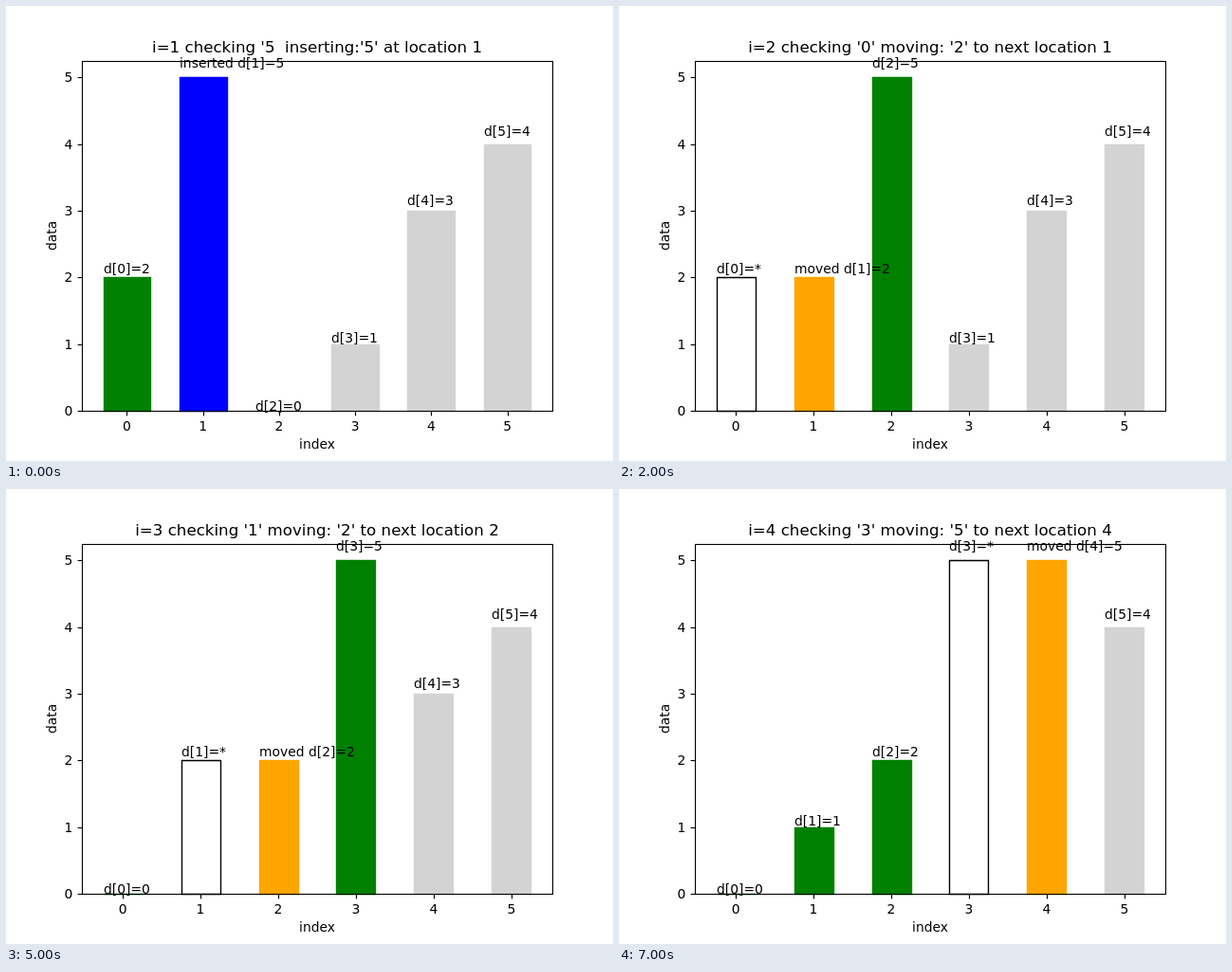
Recreate the animation shown at these times as an HTML page with a canvas. Size 640 by 480 pixels, loop 8 s.

```html
<!DOCTYPE html>
<html lang="en">
<head>
<meta charset="utf-8">
<title>Insertion sort</title>
<style>
html, body { margin: 0; width: 100%; height: 100%; overflow: hidden; background: #fff; }
canvas { display: block; }
</style>
</head>
<body>
<canvas id="chart" width="640" height="480"></canvas>
<script>
const ctx = document.getElementById('chart').getContext('2d');
const LEFT = 80, RIGHT = 576, TOP = 57.6, BOTTOM = 427.2;
const UNIT = (BOTTOM - TOP) / 5.25;
const STEP_MS = 1000, STEP_COUNT = 8;

const snap = v => Math.floor(v + 0.5) + 0.5;
const valueY = v => BOTTOM - v * UNIT;

// Record every move and insertion of the sort.
function sortSteps(data) {
  const steps = [];
  for (let i = 1; i < data.length; i++) {
    const key = data[i];
    let j = i;
    for (; j > 0 && data[j - 1] > key; j--) {
      data[j] = data[j - 1];
      steps.push({ data: [...data], i, at: j, hole: j - 1, barWidth: 0.5,
        color: '#ffa500', verb: 'moved',
        title: `i=${i} checking '${key}' moving: '${data[j]}' to next location ${j}` });
    }
    data[j] = key;
    steps.push({ data: [...data], i, at: j, hole: -1, barWidth: 0.62,
      color: '#0000ff', verb: 'inserted',
      title: `i=${i} checking '${key}  inserting:'${key}' at location ${j}` });
  }
  return steps.slice(0, STEP_COUNT);
}

function text(str, x, y, align = 'left', size = 13.889) {
  ctx.font = `${size}px "DejaVu Sans", sans-serif`;
  ctx.textAlign = align;
  ctx.fillText(str, x, y);
}

function line(x1, y1, x2, y2) {
  ctx.beginPath();
  ctx.moveTo(x1, y1);
  ctx.lineTo(x2, y2);
  ctx.stroke();
}

function bar(x, width, value, fill, edge) {
  const x1 = snap(x), y1 = snap(valueY(value));
  ctx.beginPath();
  ctx.rect(x1, y1, snap(x + width) - x1, snap(BOTTOM) - y1);
  ctx.fillStyle = fill;
  ctx.strokeStyle = edge;
  ctx.lineWidth = 1.389;
  ctx.fill();
  ctx.stroke();
}

function draw({ data, i, at, hole, barWidth, color, verb, title }) {
  const margin = (RIGHT - LEFT) / 22;
  const spacing = (RIGHT - LEFT - 2 * margin) / (data.length - 1 + barWidth);
  const width = barWidth * spacing;
  const barX = n => LEFT + margin + n * spacing;

  ctx.fillStyle = '#fff';
  ctx.fillRect(0, 0, 640, 480);

  data.forEach((value, n) => {
    const fill = n === hole ? '#fff' : n === at ? color : n <= i ? '#008000' : '#d3d3d3';
    bar(barX(n), width, value, fill, n === hole ? '#000' : fill);
  });

  ctx.fillStyle = ctx.strokeStyle = '#000';
  ctx.lineWidth = 1.111;
  ctx.strokeRect(snap(LEFT), snap(TOP), RIGHT - LEFT, snap(BOTTOM) - snap(TOP));

  data.forEach((value, n) => {
    const center = barX(n) + width / 2, y = snap(valueY(n));
    line(snap(center), 427.5, snap(center), 432.4);
    line(75.6, y, 80.5, y);
    text(n, center, 448, 'center');
    text(n, 70.3, Math.round(valueY(n) + 5), 'right');
    const label = `d[${n}]=${n === hole ? '*' : value}`;
    text(n === at ? `${verb} ${label}` : label,
      Math.round(barX(n)), Math.round(BOTTOM - 1.03 * value * UNIT));
  });

  text(title, 328, 49, 'center', 16.667);
  text('index', 328, 467, 'center');
  ctx.save();
  ctx.translate(53, 242.4);
  ctx.rotate(-Math.PI / 2);
  text('data', 0, 0, 'center');
  ctx.restore();
}

const steps = sortSteps([2, 5, 0, 1, 3, 4]);
const start = performance.now();

function tick() {
  const elapsed = performance.now() - start;
  draw(steps[Math.floor(elapsed / STEP_MS) % steps.length]);
  requestAnimationFrame(tick);
}
tick();
</script>
</body>
</html>
```
